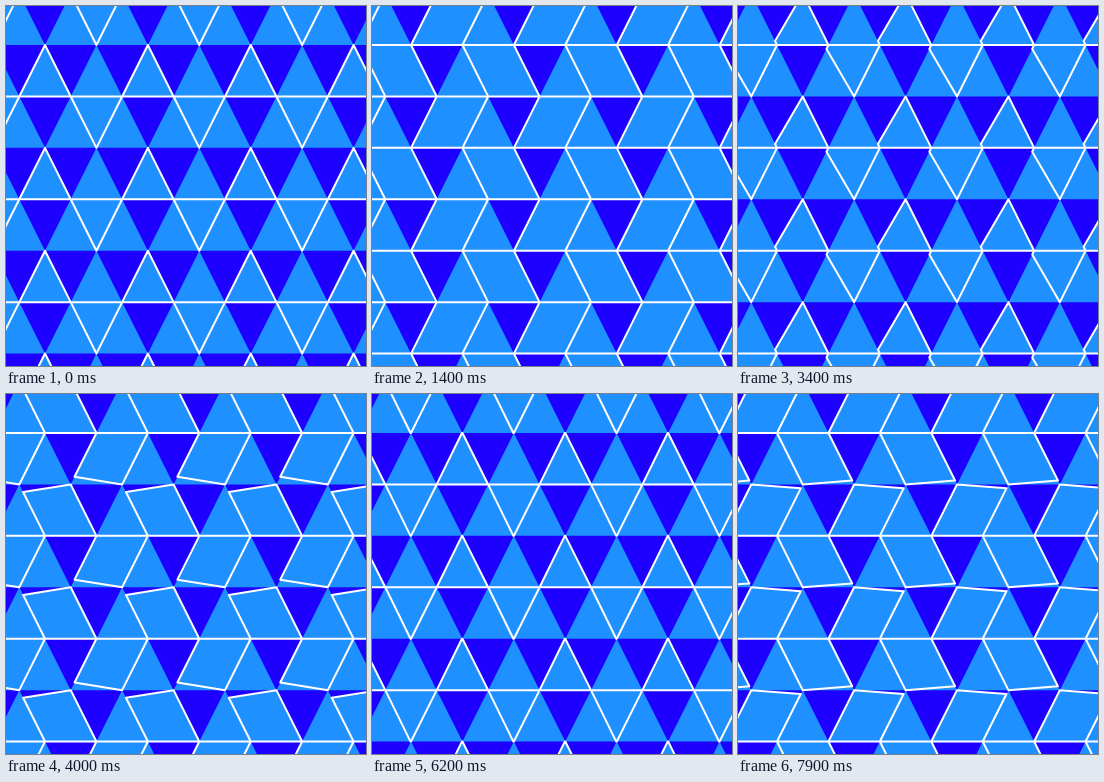
Animation, 360 px wide and 360 px high, one loop 8 s. Source, as an HTML page with a canvas:

```html
<!DOCTYPE html>
<html>
<head>
<meta charset="utf-8">
<style>
html, body { margin: 0; width: 100%; height: 100%; overflow: hidden; background: #1e00ff; }
canvas { display: block; }
</style>
</head>
<body>
<canvas id="stage" width="360" height="360"></canvas>
<script>
const ctx = document.getElementById('stage').getContext('2d');
const SIDE = 360 / 7, ORIGIN = 39;
const LOOP = 8000, STEP = 100, PHASE = 1500;

const ease = s => s < 0.5 ? 4 * s ** 3 : 1 - 4 * (1 - s) ** 3;

// Unit tile: one corner slides per phase, walking the triangle one side left per four phases.
function tile(u) {
  const e = ease(u % 1);
  return [
    [[-e, 0], [0, 0], [0.5, 1], [-0.5, 1]],
    [[-1, 0], [0, 0], [0.5 - e / 2, 1 - e], [-0.5, 1]],
    [[-1, 0], [0, 0], [-0.5, 1], [-1 - e / 2, e]],
    [[-1, 0], [-e, 0], [-0.5, 1], [-1.5, 1]]
  ][Math.floor(u) % 4];
}

function addShape(points, x, y, flip) {
  points.forEach(([px, py], i) => {
    const cx = ORIGIN + (x + px) * SIDE;
    const cy = ORIGIN + (y + (flip ? 1 - py : py)) * SIDE;
    if (i) ctx.lineTo(cx, cy);
    else ctx.moveTo(cx, cy);
  });
  ctx.closePath();
}

function draw(t) {
  const u = t / PHASE;
  const shape = tile(u);
  const shift = -Math.floor(u / 4);

  ctx.fillStyle = '#1e00ff';
  ctx.fillRect(0, 0, 360, 360);
  ctx.fillStyle = '#1e90ff';
  ctx.strokeStyle = '#fff';
  ctx.lineWidth = 2;
  ctx.lineJoin = 'round';

  // Fixed upright triangles
  ctx.beginPath();
  for (let row = -1; row < 7; row++)
    for (let col = -2; col < 9; col++)
      addShape([[0, 0], [0.5, 1], [-0.5, 1]], col + (row & 1) / 2, row);
  ctx.fill();

  // Moving tiles, mirrored on every other row
  ctx.beginPath();
  for (let row = -1; row < 7; row++)
    for (let col = -4; col < 12; col += 2)
      addShape(shape, col + (row & 1) + shift, row, row & 1);
  ctx.fill();
  ctx.stroke();
}

function frame() {
  const t = performance.now() % LOOP;
  draw(Math.floor(t / STEP) * STEP);
  requestAnimationFrame(frame);
}
frame();
</script>
</body>
</html>
```
